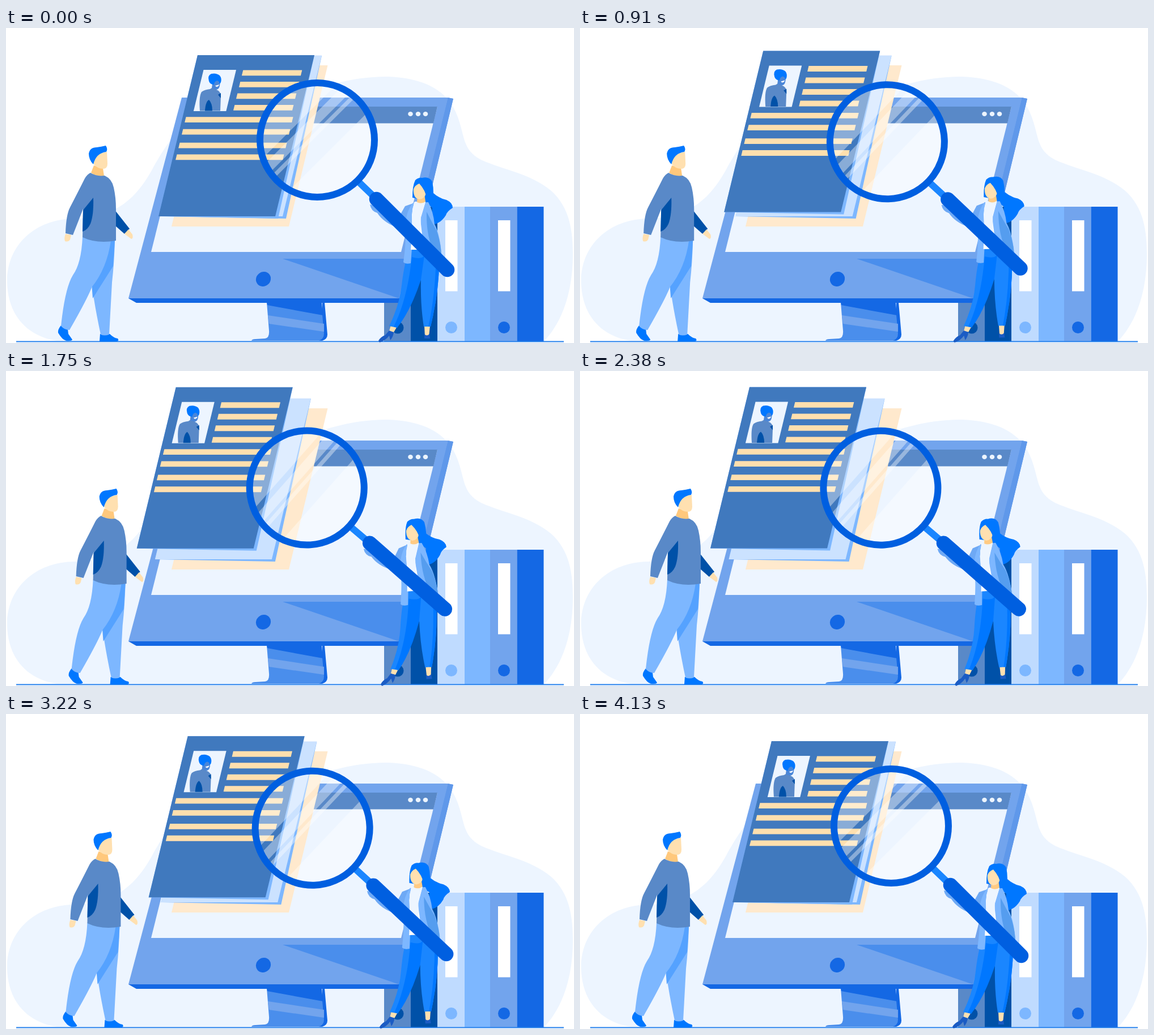
An HTML page that plays this animation: 1002x557 px, repeating every 4.2 s.

```html
<!DOCTYPE html>
<html lang="en">
<head>
<meta charset="utf-8">
<title>Document search</title>
<style>
html, body { margin: 0; width: 100%; height: 100%; overflow: hidden; background: #fff; }
svg { display: block; width: 100%; height: 100%; }
.skin { fill: #ffe0b0; }
.navy { fill: #0051a8; }
.hair { fill: #0077ff; }
.slate { fill: #5989c8; }
.royal { fill: #1468e4; }
.sky { fill: #7db7ff; }
.steel { fill: #72a4ed; }
.pale { fill: #edf5ff; }
.mid { fill: #4a8eec; }
</style>
</head>
<body>
<svg viewBox="0 0 1002 557">
  <defs>
    <clipPath id="lens"><circle cx="549" cy="198" r="97"/></clipPath>
  </defs>

  <path class="pale" d="M90 553C35 545 2 505 2 447C2 385 50 338 120 337C185 336 225 310 258 250C290 192 330 130 430 130C520 130 570 86 672 86C740 88 780 112 796 155C810 190 804 215 838 233C880 252 925 257 962 288C995 318 1000 360 1000 400C1000 460 985 515 950 553Z"/>

  <g id="folders">
    <path class="slate" d="M667 316h47v238h-47z"/>
    <path class="navy" d="M714 316h47v238h-47z"/>
    <path fill="#bfdbff" d="M761 316h48v238h-48z"/>
    <path class="sky" d="M809 316h45v238h-45z"/>
    <path class="steel" d="M854 316h47.500v238h-47.500z"/>
    <path class="royal" d="M901.500 316h47v238h-47z"/>
    <path fill="#fff" d="M775 340h21.500v125.500h-21.500zM868 340h21.500v125.500h-21.500z"/>
    <circle class="navy" cx="691" cy="530" r="10.500"/>
    <circle class="sky" cx="785.500" cy="529.500" r="10.500"/>
    <circle class="royal" cx="878.500" cy="529.500" r="10.500"/>
  </g>

  <g id="monitor">
    <path class="royal" d="M558 485L562 485L567 542Q567 550 558 553H470L466 545H550Q559 545 558 530Z"/>
    <path class="mid" d="M460 485H556L561 540Q561 550 552 553H433Q434 550 440 550L457 549Q465 548 464 535Z"/>
    <path class="royal" d="M460 485H557L559 508L461 490Z"/>
    <path class="steel" d="M462 508L561 523L561 537L464 523Z"/>
    <path class="royal" d="M216 478H703L701 486H230Z"/>
    <path fill="#5f98ea" d="M778 123L789 125L704 478H690Z"/>
    <path class="steel" d="M310 123H780L693 478H216Z"/>
    <path fill="#5f98ea" d="M780 123L789 125L704 478H693Z"/>
    <path class="mid" d="M488 408H710L693 478Z"/>
    <path class="pale" d="M320 139H761L697 396H256Z"/>
    <path class="slate" d="M320 139H761L754 168.500H313Z"/>
    <g class="pale">
      <ellipse cx="713.500" cy="152" rx="4.300" ry="4"/>
      <ellipse cx="727" cy="152" rx="4.300" ry="4"/>
      <ellipse cx="740" cy="152" rx="4.300" ry="4"/>
    </g>
    <ellipse class="royal" cx="454" cy="444" rx="13.500" ry="12.500" transform="rotate(-40 454 444)"/>
  </g>

  <path d="M18 554.500H984" stroke="#2580ec" stroke-width="2"/>

  <path fill="#ffe9cd" d="M361 66H567.500L499 351H292Z"/>

  <g id="sheet">
    <path class="sky" d="M351 49H557L494 337L282 333Z"/>
    <path fill="#cbe2ff" d="M351 48.500H557L488 333H282Z"/>
  </g>

  <g id="resume">
    <path class="sky" d="M338 48H544L480 337L269 333Z"/>
    <path fill="#4079be" d="M338 48H544L475 333H269Z"/>
    <g transform="matrix(1 0 -.242 1 338 48)">
      <path class="pale" d="M16.800 26h57.500v73h-57.500z"/>
      <g id="lines" fill="#ffdfae"></g>
    </g>
    <path class="slate" d="M342 146.500Q340 121 345 113Q350 109 360 108L363 106L364 99L372 104L371 109Q379 112 379 120L378 146.500Z"/>
    <path class="navy" d="M351 146.500Q352 130 358 127Q364 133 364 146.500Z"/>
    <path class="navy" d="M374 118L379 115L379 124Z"/>
    <path fill="#4a86d8" d="M364 92H377Q379 108 371 109L364 107Z"/>
    <path class="hair" d="M358 94Q355 84 362 81Q371 79 377 84Q381 89 379 96L377 99Q376 93 372 93Q367 95 367 100Q360 100 358 94Z"/>
    <path fill="#fff" d="M369 102L376 100Q375 104 371 104Z"/>
  </g>

  <g id="man">
    <path class="navy" d="M192 322L218 355L209 364L192 349Z"/>
    <path class="skin" d="M216 356L223 365Q225 372 221 373L209 364Z"/>
    <path class="skin" d="M105 364L115 366L113 374Q110 379 104 377Q102 372 105 364Z"/>
    <path class="hair" d="M97 526L109 533L110 541L117 551Q116 554 106 553Q99 551 92 539Q91 533 97 526Z"/>
    <path class="hair" d="M166 541H183Q190 548 197 549Q200 553 196 554H165Z"/>
    <path class="sky" d="M135 369L192 375Q191 415 187 450L182 542Q174 545 167 542Q156 490 152 457Q143 480 112 534Q103 534 97 527Q104 460 118 437Q133 416 135 369Z"/>
    <path fill="#55a2ff" d="M185 376H192L189 421L153 478L151.500 458Q178 425 185 376Z"/>
    <path fill="#ffc87c" d="M155 243L171 248L173 262Q160 263 150 256Z"/>
    <path class="skin" d="M155 236Q158 222 178 219L179 240Q179 249 171 249Q160 248 155 241Z"/>
    <path class="hair" d="M154 241Q146 233 146 222Q148 211 160 211Q168 210 176 208Q180 214 177 219Q159 221 154 241Z"/>
    <path class="slate" d="M149 256Q160 263 174 261Q187 267 190 282Q194 300 194 320V376Q160 382 135 370L136 320L118 366L105 363Q106 330 113 317Q127 290 139 266Q143 259 149 256Z"/>
    <path class="navy" d="M154 300Q155 330 149 346Q144 357 135 360L136 322Z"/>
  </g>

  <g id="searcher">
    <path class="skin" d="M680 522L691 526L684 538L676 536ZM738 526H748L746 547H739Z"/>
    <path fill="#1b5cc4" d="M657 553Q661 546 669 543L676 535L684 538Q683 546 678 552L676 544Q669 553 659 556Z"/>
    <path fill="#1b5cc4" d="M738 541Q742 546 747 541L748 549H738Z"/>
    <path class="hair" d="M717 300Q717 279 722 269Q728 264 734 265Q747 262 752 272Q754 281 754 292Q764 301 777 304Q788 309 788 318Q778 324 776 331Q768 344 756 347Q750 333 752 318L735 304Z"/>
    <path fill="#1a86ff" d="M714 388H757L764 420Q763 470 749 528H737Q731 490 732 445Q718 480 690 530L676 527Q694 490 698 455Q703 410 714 388Z"/>
    <path class="hair" d="M716 405Q734 410 738 402L732 445Q714 500 690 530L684 528Q708 480 716 405ZM759 395L764 420Q763 470 749 528H745Q758 470 759 395Z"/>
    <path fill="#6ea9f5" d="M642 312Q652 313 660 320L690 340L704 315L724 308L719 355L688 352Q665 343 655 327Q644 324 642 312Z"/>
    <path class="sky" d="M718 309L745 308Q754 325 756 347Q766 365 769 408L745 410L735 391L716 390L714 416Q705 418 701 414Q706 380 705 350Q705 325 718 309Z"/>
    <path fill="#fff" d="M720 308L740 308L731 338L737 392H714Q717 360 716 330Z"/>
    <path class="pale" d="M721 307H740L732 332L731 378L720 385Q715 350 717 320Z"/>
    <path fill="#559def" d="M742 325Q752 345 760 359Q768 382 768 405L756 398Q741 370 742 325Z"/>
    <path fill="#ffcb84" d="M726 295L738 293L740 307Q733 312 725 308Z"/>
    <path class="skin" d="M719 285Q721 278 730 274Q739 284 741 292Q739 302 729 303Q718 301 719 285Z"/>
    <path class="hair" d="M718 287Q720 270 729 268L746 278L742 301Q740 287 729 275Q720 278 718 287Z"/>
    <path d="M622 272L653 302" stroke="#1a86ff" stroke-width="12"/>
    <g id="glass" clip-path="url(#lens)" fill="#fff" fill-opacity=".38"></g>
    <circle cx="549" cy="198" r="101" fill="none" stroke="#005fe0" stroke-width="12"/>
    <path d="M653.500 302.500L778.500 427.500" stroke="#005fe0" stroke-width="25.500" stroke-linecap="round"/>
  </g>
</svg>
<script>
const LOOP = 4200;
const byId = id => document.getElementById(id);

const textLine = (x, y, width) => `<rect x="${x}" y="${y}" width="${width}" height="9.800"/>`;
byId('lines').innerHTML =
  [26.5, 47, 67.5, 88].map(y => textLine(86.7, y, 104)).join('') +
  [109.3, 130.7, 154.7, 175.5].map(y => textLine(6, y, 189)).join('');

// Diagonal reflections: each pair spans x + y, measured from the lens centre.
byId('glass').innerHTML = [[-200, -64], [-50, -26], [-18, -8], [40, 200]]
  .map(([from, to]) => `<path d="M${from + 120} -120H${to + 120}L${to - 120} 120H${from - 120}Z" transform="translate(549 198)"/>`)
  .join('');

// Cubic Bezier easing (.5, 0, .5, 1), solved by bisection.
function ease(x) {
  let low = 0, high = 1;
  for (let i = 0; i < 20; i++) {
    const s = (low + high) / 2;
    if (1.5 * s - 1.5 * s * s + s ** 3 < x) low = s; else high = s;
  }
  return low * low * (3 - 2 * low);
}

function move(id, transform) {
  byId(id).setAttribute('transform', transform);
}

function draw(now) {
  const phase = (now % LOOP) / LOOP;
  const p = ease(1 - Math.abs(1 - 2 * phase));
  move('resume', `translate(${-40 * p} ${-20 * p})`);
  move('sheet', `translate(${-20 * p} 0)`);
  move('man', `translate(${19.5 * p} 0)`);
  move('searcher', `rotate(${-3.8 * p} 675 490)`);
}

let start;
function tick(now) {
  start ??= now;
  draw(now - start);
  requestAnimationFrame(tick);
}
draw(0);
requestAnimationFrame(tick);
</script>
</body>
</html>
```
